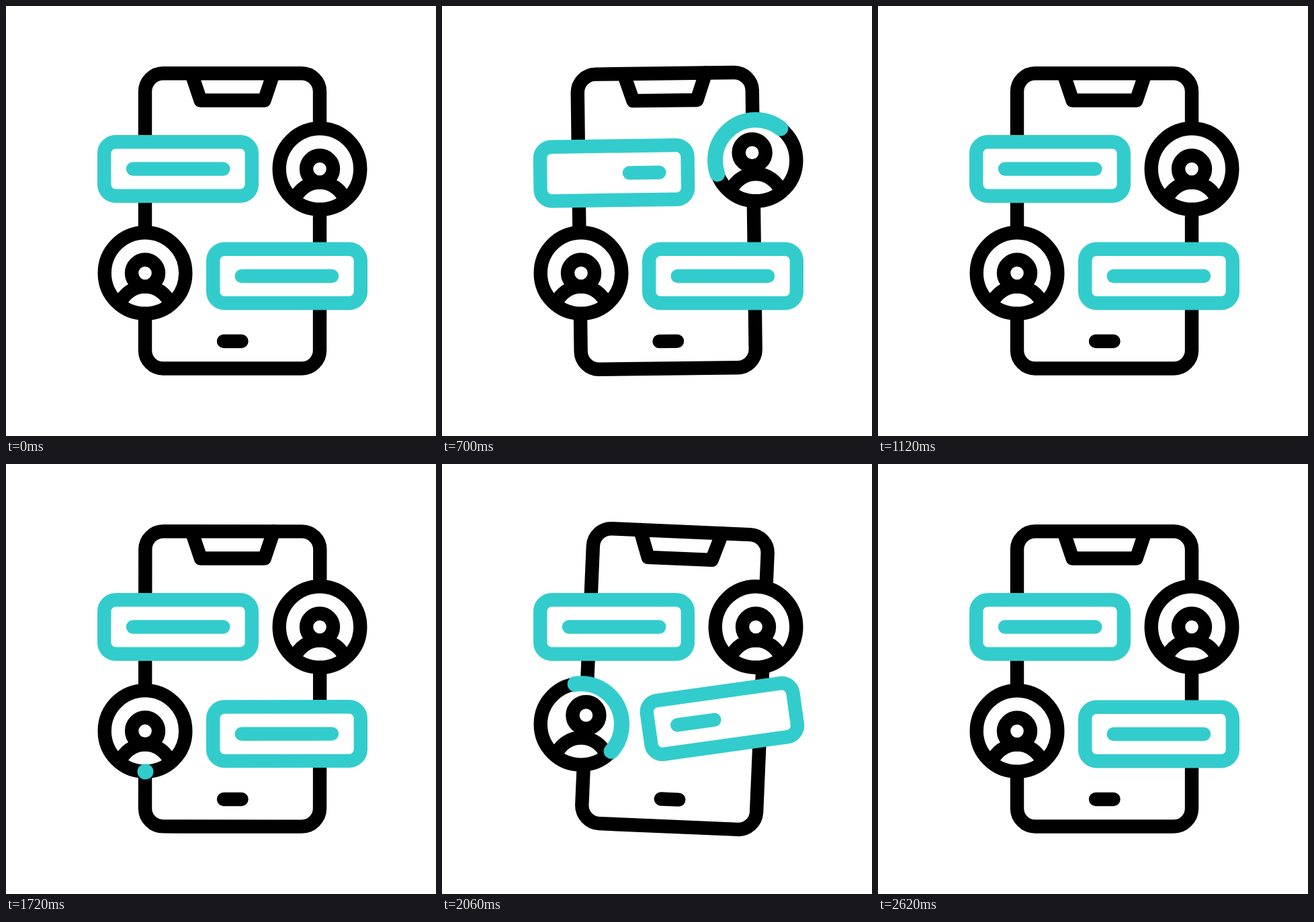
Animation, 640 px wide and 640 px high, one loop 3000 ms. Source, as an HTML page:

```html
<!DOCTYPE html>
<html lang="en">
<head>
<meta charset="utf-8">
<title>Chat on a phone</title>
<style>
  @property --head { syntax: "<length>"; inherits: false; initial-value: 0px; }
  @property --tail { syntax: "<length>"; inherits: false; initial-value: 0px; }

  html, body { margin: 0; width: 100%; height: 100%; overflow: hidden; background: #fff; }
  svg { display: block; width: 100vw; height: 100vh; }

  .ink, .teal { fill: none; stroke-width: 20.4; stroke-linecap: round; stroke-linejoin: round; }
  .ink { stroke: #000; }
  .teal { stroke: #3cc; }
  .paper { fill: #fff; }
  .shoulders { stroke-linecap: butt; }

  /* Each side plays for 900 ms of the 3 s loop */
  .first { --delay: .2s; --lift: 7px; --nod: -6.2px; }
  .second { --delay: 1.7s; --lift: -7px; --nod: 7.5px; }

  .phone, .bubble, .bar, .avatar, .face, .arc {
    animation: 3s cubic-bezier(.3333, 0, .6667, 1) var(--delay, .2s) infinite;
  }
  .phone { transform-origin: 337px 540px; animation-name: sway; animation-duration: 1.5s; }
  .bubble { animation-name: swing, lift; }
  .first.bubble { transform-origin: 376px 242.5px; }
  .second.bubble { transform-origin: 298px 402px; }
  .bar { stroke-dasharray: 1.01 2; animation-name: shorten; }
  .avatar { animation-name: rise; }
  .face { animation-name: nod; }
  .arc {
    stroke-width: 23;
    opacity: 0;
    stroke-dasharray: calc(var(--head) - var(--tail)) 1000px;
    stroke-dashoffset: calc(var(--tail) * -1);
    animation-name: head, tail, show;
  }

  @keyframes sway {
    0%, 60%, 100% { rotate: 0deg; }
    20% { rotate: 3deg; }
    40% { rotate: -2deg; }
  }
  @keyframes swing {
    0%, 30%, 100% { rotate: 0deg; }
    12.67% { rotate: -8deg; }
    20% { rotate: 4.5deg; }
  }
  @keyframes lift {
    0%, 30%, 100% { translate: 0 0; }
    7.67% { translate: 0 var(--lift); }
  }
  @keyframes shorten {
    0%, 30%, 100% { stroke-dasharray: 1.01 2; }
    15.67% { stroke-dasharray: .32 2; }
  }
  @keyframes rise {
    0%, 30%, 100% { translate: 0 0; }
    16.67% { translate: 0 -12.5px; }
  }
  @keyframes nod {
    0%, 30%, 100% { translate: 0 0; }
    12.83% { translate: var(--nod) -13.5px; }
  }
  @keyframes head {
    0% { --head: 0px; }
    23.33%, 100% { --head: 360px; }
  }
  @keyframes tail {
    0%, 6.67% { --tail: 0px; }
    30%, 100% { --tail: 360px; }
  }
  @keyframes show {
    0%, 30.4%, 100% { opacity: 0; animation-timing-function: step-end; }
    .4% { opacity: 1; animation-timing-function: step-end; }
  }
</style>
</head>
<body>
<svg viewBox="0 0 640 640">
  <g class="phone ink">
    <rect x="207" y="100.3" width="260" height="439.2" rx="27"/>
    <path d="M276 100.3 289.5 140.5H384.5L398 100.3M324 499H350.5"/>
  </g>

  <g class="first bubble teal">
    <rect class="paper" x="146.2" y="202.2" width="219.6" height="80.6" rx="17"/>
    <path class="bar" pathLength="1" d="M323.3 242.5H189"/>
  </g>
  <g class="second bubble teal">
    <rect class="paper" x="308.2" y="361.7" width="219.6" height="80.6" rx="17"/>
    <path class="bar" pathLength="1" d="M350.7 402H485"/>
  </g>

  <g transform="translate(467 242.5)">
    <g class="first avatar ink">
      <circle class="paper" r="60.3"/>
      <path class="shoulders" d="M-37.7 46.7A40 40 0 0 1 37.7 46.7"/>
      <circle class="face paper" r="20"/>
      <path class="arc teal" pathLength="360" d="M0 60.5a60.5 60.5 0 0 0 0-121a60.5 60.5 0 0 0 0 121"/>
    </g>
  </g>
  <g transform="translate(207 397.5)">
    <g class="second avatar ink">
      <circle class="paper" r="60.3"/>
      <path class="shoulders" d="M-37.7 46.7A40 40 0 0 1 37.7 46.7"/>
      <circle class="face paper" r="20"/>
      <path class="arc teal" pathLength="360" d="M0 60.5a60.5 60.5 0 0 0 0-121a60.5 60.5 0 0 0 0 121"/>
    </g>
  </g>
</svg>
</body>
</html>
```
